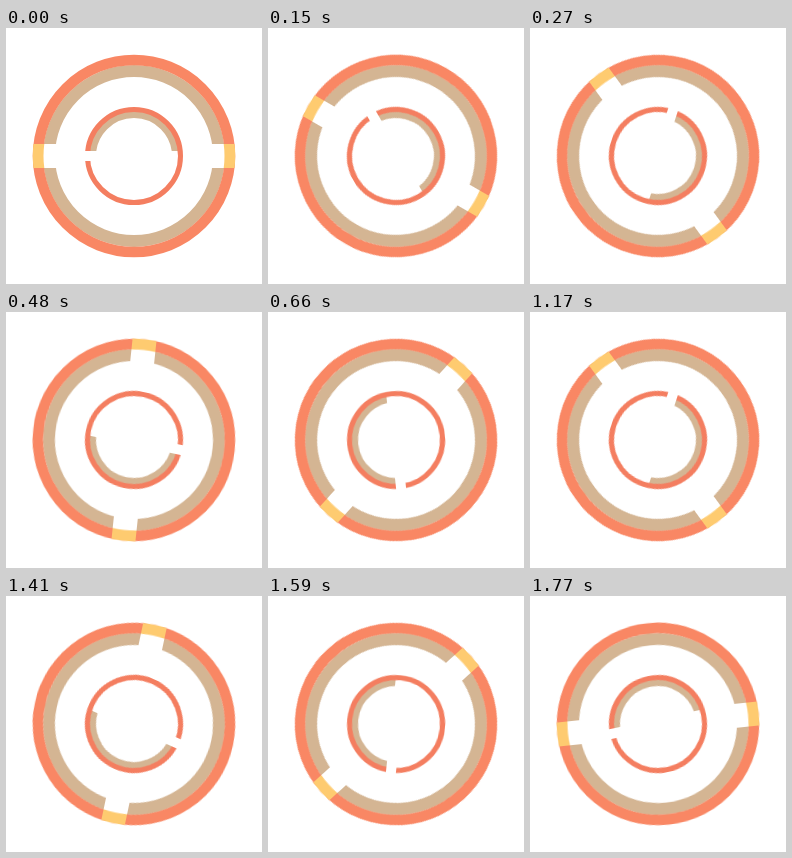
An HTML page for the animation above (1.8 s loop, 256 px wide and 256 px high).

```html
<!DOCTYPE html>
<html lang="en">
<head>
<meta charset="utf-8">
<title>Double ring loader</title>
<style>
  html, body { margin: 0; width: 100%; height: 100%; overflow: hidden; background: #fff; }
  svg { display: block; width: 100vw; height: 100vh; }
  .coral { stroke: #f98764; }
  .tan { stroke: #d4b593; }
  .yellow { fill: #fecb70; }
  .white { fill: #fff; }
  .inner .coral { stroke: #f47e60; }
  .ring { fill: none; }
</style>
</head>
<body>
<svg viewBox="0 0 256 256">
  <defs>
    <clipPath id="band"><rect x="-104" y="-12" width="208" height="24"/></clipPath>
    <clipPath id="upper"><rect x="-50" y="-50" width="100" height="45"/></clipPath>
  </defs>
  <g transform="translate(128 128)">
    <g class="outer">
      <circle class="ring tan" r="85" stroke-width="12"/>
      <circle class="ring coral" r="96" stroke-width="10.5"/>
      <g clip-path="url(#band)">
        <circle class="yellow" r="101.25"/>
        <circle class="white" r="90.5"/>
      </g>
    </g>
    <g class="inner">
      <circle class="ring tan" r="41.5" stroke-width="7" clip-path="url(#upper)"/>
      <circle class="ring coral" r="46.5" stroke-width="5"/>
      <rect class="white" x="-52" y="-5" width="14" height="10"/>
    </g>
  </g>
</svg>
<script>
  // The outer ring repeats after half a turn, the inner after a full one.
  const spin = (name, turn) =>
    document.querySelector(name).animate(
      [{ transform: 'rotate(0deg)' }, { transform: `rotate(${turn}deg)` }],
      { duration: 900, easing: 'steps(30, end)', iterations: Infinity }
    );

  spin('.outer', 180);
  spin('.inner', 360);
</script>
</body>
</html>
```
